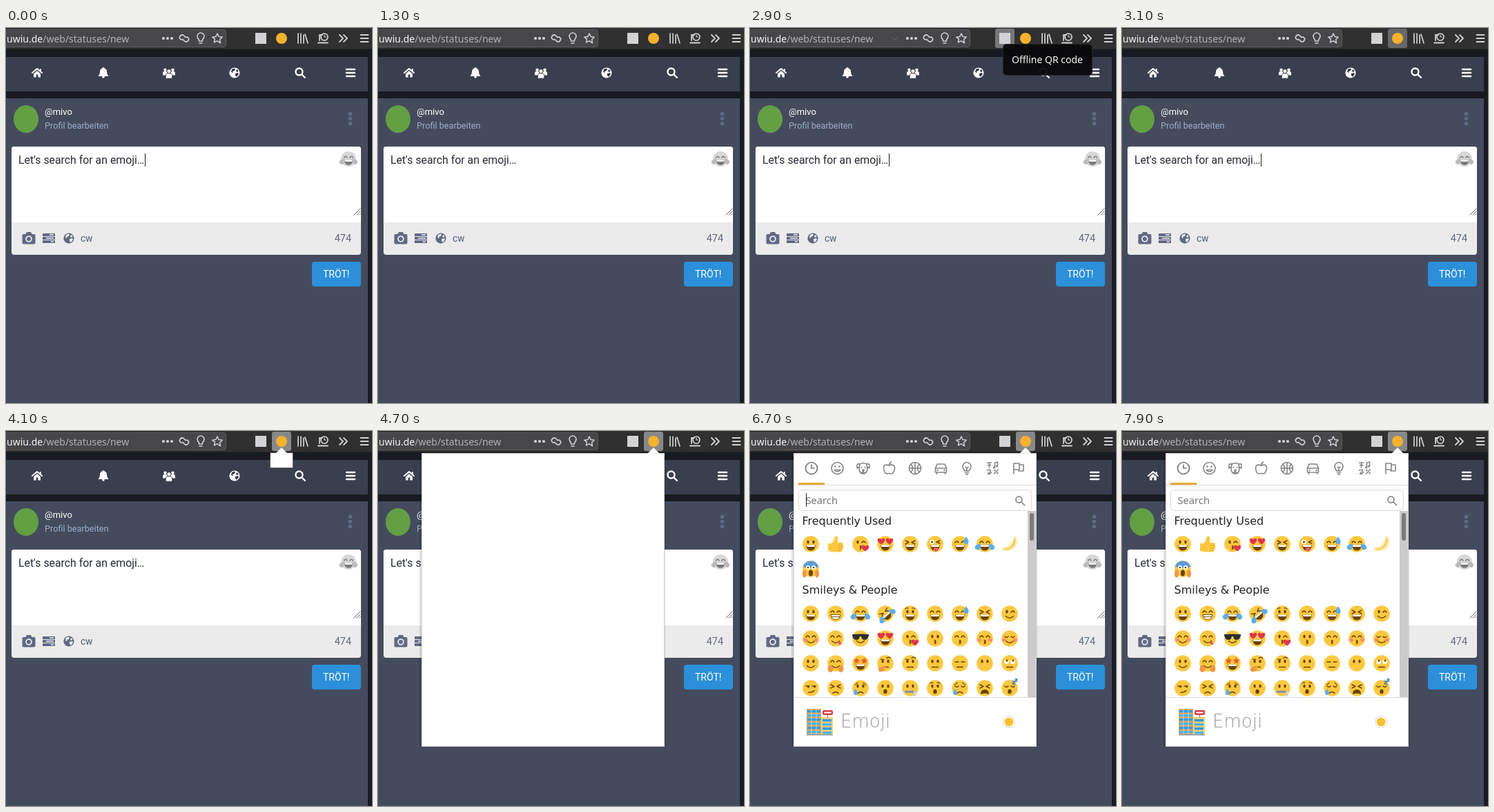
An HTML page for the animation above (8000 ms loop, 530 by 544 pixels).

```html
<!DOCTYPE html>
<html lang="de">
<head>
<meta charset="utf-8">
<title>Emoji picker</title>
<style>
  html, body { margin: 0; width: 100%; height: 100%; overflow: hidden; background: #191b22; }
  svg { display: block; width: 100vw; height: 100vh; }
  text { white-space: pre; }
  .roboto { font-family: Roboto, sans-serif; }
  .noto { font-family: "Noto Sans", sans-serif; }
  .dejavu { font-family: "DejaVu Sans", sans-serif; }
  .gray { filter: grayscale(1); opacity: .72; }
</style>
</head>
<body>
<svg id="stage" viewBox="0 0 530 544"></svg>
<script>
const LOOP = 8000;
const BROWN = '#664500', RED = '#e0344a', BLUE = '#5dadec', YELLOW = '#fdc840', SLATE = '#606984';

// Drawing helpers
const fill = (d, color) => `<path d="${d}" fill="${color}"/>`;
const line = (d, color = BROWN, width = 1.5) =>
  `<path d="${d}" fill="none" stroke="${color}" stroke-width="${width}" stroke-linecap="round" stroke-linejoin="round"/>`;
const oval = (x, y, rx, ry, color) => `<ellipse cx="${x}" cy="${y}" rx="${rx}" ry="${ry}" fill="${color}"/>`;
const disc = (x, y, r, color) => oval(x, y, r, r, color);
const ring = (x, y, r, color, width) =>
  `<circle cx="${x}" cy="${y}" r="${r}" fill="none" stroke="${color}" stroke-width="${width}"/>`;
const box = (x, y, w, h, color, r = 0, more = '') =>
  `<rect x="${x}" y="${y}" width="${w}" height="${h}" rx="${r}" fill="${color}" ${more}/>`;
const text = (x, y, size, color, font, words, more = '') =>
  `<text x="${x}" y="${y}" font-size="${size}" fill="${color}" class="${font}" ${more}>${words}</text>`;
const at = (x, y, art, more = '') => `<g transform="translate(${x} ${y}) ${more}">${art}</g>`;
const during = (spans, art, more = '') => `<g data-on="${spans}" ${more}>${art}</g>`;

const heart = (x, y, s) => at(x, y, fill('M0 4C-8-1-4-6 0-2.4 4-6 8-1 0 4z', RED), `scale(${s})`);
const drop = (x, y, s = 1) => at(x, y, fill('M0-4C2-1 3 0 3 2A3 3 0 0 1-3 2C-3 0-2-1 0-4z', BLUE), `scale(${s})`);
const star = (x, y, r, color) => {
  const points = Array.from({ length: 10 }, (_, i) => {
    const a = i * Math.PI / 5, k = i % 2 ? r * .48 : r;
    return `${(x + k * Math.sin(a)).toFixed(2)},${(y - k * Math.cos(a)).toFixed(2)}`;
  });
  return fill(`M${points.join('L')}z`, color);
};

// Face parts, drawn around the centre of a disc with radius 12
const parts = {
  dots: oval(-4, -3, 1.7, 2.5, BROWN) + oval(4, -3, 1.7, 2.5, BROWN),
  arcs: line('M-7-2q2.5-4 5 0M2-2q2.5-4 5 0'),
  squint: line('M-7-5l5 2.5-5 2.5M7-5l-5 2.5 5 2.5'),
  wink: oval(-4, -3, 1.7, 2.5, BROWN) + line('M2-2q2.5-4 5 0'),
  lids: line('M-7-3q2.5 3 5 0M2-3q2.5 3 5 0'),
  dashes: line('M-7-2h5M2-2h5'),
  side: line('M-7-3h5M2-3h5') + disc(-3.5, -2, 1.5, BROWN) + disc(5.5, -2, 1.5, BROWN),
  hearts: heart(-6, -4, 1.15) + heart(6, -4, 1.15),
  stars: star(-5.5, -3.5, 5.2, '#e95f28') + star(5.5, -3.5, 5.2, '#e95f28'),
  shades: fill('M-12-6Q0-7 12-6v2q-1 1-1.5 3.5Q9 2 5.5 2 2 2 1-3h-2Q-2 2-5.5 2-9 2-10.5-.5-11-3-12-4z', '#292f33'),
  roll: disc(-4.5, -2, 3.3, '#fff') + disc(4.5, -2, 3.3, '#fff') + disc(-4, -4, 1.5, BROWN) + disc(5, -4, 1.5, BROWN),
  wide: disc(-4.5, -3, 3.3, '#fff') + disc(-4.5, -3, 1.6, BROWN) + line('M2-3l5-2M2-3l5 2'),
  brows: line('M-7-7q2-2 4-1M3-8q2-1 4 1', BROWN, 1.2),
  skeptic: line('M-7-6l5 .6M2-7.5q2.5-2.5 5.5 0', BROWN, 1.2),
  worry: line('M-8-5q2 0 4-3M8-5q-2 0-4-3', BROWN, 1.2),
  grin: fill('M-7 1.5h14Q6 9.5 0 9.5T-7 1.5z', BROWN) + fill('M-6.3 1.5h12.6l-.6 2.4H-5.7z', '#fff'),
  teeth: fill('M-7 1.5h14Q6 8.5 0 8.5T-7 1.5z', '#fff') + line('M-7 1.5h14Q6 8.5 0 8.5T-7 1.5zM-6 4.5H6', BROWN, .9),
  smile: line('M-5.5 3.5q5.5 5.5 11 0'),
  smirk: line('M-3 6q5 1 8-2.5'),
  kiss: line('M-.8 2.5q4 .8 0 2.5 4 1.2 0 2.7', BROWN, 1.4),
  flat: line('M-4.5 5.5h9'),
  frown: line('M-4 7.5q4-4 8 0'),
  oh: oval(0, 5, 2.7, 3.3, BROWN),
  wail: fill('M-6 9Q-6 2 0 2T6 9Q0 6-6 9z', BROWN),
  tongue: fill('M-2 5h6v4q-3 4-6 0z', '#e8596e'),
  lick: fill('M2 5q5-2 6 1t-3 3z', '#e8596e'),
  blush: oval(-8, 2, 3, 2.5, '#ff8a70') + oval(8, 2, 3, 2.5, '#ff8a70'),
  tears: at(-9, 3, drop(0, 0, 1.2), 'rotate(40)') + at(9, 3, drop(0, 0, 1.2), 'rotate(-40)'),
  sweat: drop(9, -6, 1.2),
  tear: drop(-7, 5),
  love: heart(7, 6, 1.15),
  zip: box(-8, 3.5, 15, 3.5, '#9aa9b5', 1) + line('M-6.5 5.2h12', '#5e6b76', .8) + box(5, 4, 3, 8, '#c8d2da', 1),
  hands: oval(-7.5, 8, 4, 5, '#ef9645') + oval(7.5, 8, 4, 5, '#ef9645'),
  think: fill('M-9 12q-3-5 1-6l8-2q2 1 0 2l-4 1.5q5 0 3 2-1 3-8 2.5z', '#ef9645'),
  snooze: line('M4-10h4l-4 4h4M8-13h3l-3 3h3', '#3b78b5', 1.5),
  scream: fill('M-11.5-3A12 12 0 0 1 11.5-3Q0 1-11.5-3z', '#5b9bd5') + disc(-4, -2, 3, '#fff') + disc(4, -2, 3, '#fff') +
    disc(-4, -2, 1.3, BROWN) + disc(4, -2, 1.3, BROWN) + oval(0, 6, 3, 4.5, BROWN) +
    oval(-9, 7, 3, 5.5, '#ef9645') + oval(9, 7, 3, 5.5, '#ef9645')
};
const face = names => disc(0, 0, 11.8, YELLOW) + names.split(' ').map(n => parts[n]).join('');

const objects = {
  thumb: fill('M-11-1h5q4-4 5-10 4-2 4.500 3.500L3-2h6q3 1 1.500 3.500 2 2 0 4 1 2-1 3.300 0 2.700-3 2.700H-3q-4 0-8-2z', YELLOW) +
    line('M4 2h6M4 5.500h5M4 9h4', '#e69a30', .9),
  banana: fill('M6-10l3-1q4 11-3 17Q-2 12-10 9l-1-3Q4 4 6-10z', '#ffe38a') + line('M-7 7Q6 6 7.500-7', '#f1b93c', 1.2) +
    fill('M2-5q3 8-6 11l-5-1Q0 2 2-5z', '#fff3cf'),
  rofl: at(0, 0, face('squint grin tears'), 'rotate(-40)')
};
const emoji = name => objects[name] || face(name);

const joy = 'arcs grin tears', cool = 'wink kiss love';
const frequent = ['dots grin', 'thumb', cool, 'hearts grin', 'squint grin', 'wide grin tongue', 'arcs grin sweat', joy, 'banana', 'scream'];
const smileys = [
  'dots grin', 'arcs teeth', joy, 'rofl', 'dots brows grin', 'arcs grin', 'arcs grin sweat', 'squint grin', 'wink smile',
  'arcs smile blush', 'arcs smile lick', 'shades smile', 'hearts grin', cool, 'dots kiss', 'arcs kiss', 'arcs kiss blush', 'lids smile blush',
  'dots smile', 'arcs smile hands', 'stars grin', 'dots skeptic flat think', 'dots skeptic flat', 'dots flat', 'dashes flat', 'dots', 'roll flat',
  'side smirk', 'squint frown', 'dots worry frown tear', 'dots oh', 'dots zip', 'dots brows oh', 'lids worry frown tear', 'squint wail', 'lids oh snooze'
];
const grid = (names, top) =>
  names.map((name, i) => at(88 + i % 9 * 36, top + Math.floor(i / 9) * 36, emoji(name))).join('');

const globe = (color, land) => disc(0, 0, 7.6, color) +
  fill('M-4-5q3-2 5-1l-1 3-3 1 1 2-3-1zM1 1l4-1 1 2-3 4-2-2zM3-5l3 2-2 2-2-1z', land);
const glass = (color, r, w) => ring(-1.5, -1.5, r, color, w) + line(`M${r * .6} ${r * .6}l4 4`, color, w);
const bars = (color, half, gap, w) => line(`M${-half} ${-gap}h${half * 2}M${-half} 0h${half * 2}M${-half} ${gap}h${half * 2}`, color, w);
const person = (x, y, s) => at(x, y, disc(0, -4, 3.2, '#fff') + fill('M-5 7V3q0-4 5-4t5 4v4z', '#fff'), `scale(${s})`);

function toolbar() {
  const c = '#d2d2d4';
  return box(0, 0, 530, 31, '#303031') + box(0, 30.5, 530, 1, '#1c1c1e') +
    box(-8, 2.5, 326.5, 25, '#474749', 3, 'stroke="#5d5d5f"') +
    during('2500-2600', box(270, 3, 24, 24, '#69696b') + box(295, 3, 23, 24, '#606062') + line('M294.5 3v24M270 3v24', '#77777a', 1)) +
    during('2800-3000', line('M205 13.500l4 4 4-4', '#5c5c5e', 1.5)) +
    during('2800-3100', box(355, 1, 28, 28, '#78787a', 3)) +
    during('3100-3400', box(385, 1, 28, 28, '#68686a', 3)) +
    during('3400-8000', box(385, 1, 28, 28, '#88888a', 3)) +
    text(1, 20.5, 14, '#f4f4f5', 'noto', 'uwiu.de<tspan fill="#b1b1b3">/web/statuses/new</tspan>') +
    [228, 234, 240].map(x => disc(x, 15, 2.1, c)).join('') +
    at(258, 15, line('M-2 1.500l-2 .5q-4-2-2-5t5-1.500l3 3M2-1.500l2-.5q4 2 2 5t-5 1.500l-3-3', c, 1.7)) +
    at(282, 15, line('M-2.500 4V2Q-5-1-5-3a5 5 0 0 1 10 0q0 2-2.500 5v2zM-2 7h4', c, 1.6)) +
    at(306, 15, line('M0-7l2.200 4.600 5 .7-3.600 3.500.9 5L0 3.600-4.500 5.800l.9-5L-7.200-1.700l5-.7z', c, 1.5)) +
    box(361, 7, 16, 16, c) + disc(399, 15, 8, '#f6b12e') +
    at(429, 15, line('M-6-7V7M-2-7V7M2-5V7M4-6l4 13', c, 1.7)) +
    at(459, 15, line('M-5 3V-5h4M-7 6.500H7', c, 1.8) + ring(2, -2, 5, c, 1.7) + line('M2-5v3h2.500', c, 1.2)) +
    at(489, 15, line('M-6-5l5 5-5 5M0-5l5 5-5 5', c, 1.8)) + at(519, 15, bars(c, 5.5, 5, 1.8));
}

function page() {
  const nav = '#393f4f', w = '#fff';
  return box(0, 42, 524, 50, nav) + box(0, 102, 524, 442, '#444b5d') +
    at(45, 65, line('M-7 0L0-6 7 0M4.800-5v2.500', w, 2) + fill('M-5 1.500L0-3 5 1.500V6.500H1.400V2.500H-1.400V6.500H-5z', w)) +
    at(141, 65, disc(0, -6.5, 1.5, w) + fill('M-7.500 5Q-5 2.500-5-1.500-5-6.500 0-7 5-6.500 5-1.500 5 2.500 7.500 5z', w) + disc(0, 6, 1.8, w)) +
    at(236, 65, person(-5.5, -1.5, .7) + person(5.5, -1.5, .7) + `<g stroke="${nav}" stroke-width="1">${person(0, 1.5, .95)}</g>`) +
    at(331, 65, globe(w, nav)) + at(426, 65, glass(w, 5, 2.4)) + at(499, 65, bars(w, 6, 5, 2.5)) +
    oval(29, 132, 18, 20, '#62a043') +
    text(56, 126, 13, '#fff', 'roboto', '@mivo') + text(56, 146, 12.7, '#9baec8', 'roboto', 'Profil bearbeiten') +
    [122, 129, 136].map(y => box(496, y, 5, 5, SLATE, 1)).join('') +
    box(8, 172, 506, 157, '#ebebeb', 4) + fill('M8 282V176q0-4 4-4h498q4 0 4 4v106z', '#fff') +
    text(18, 197, 15.85, '#282c37', 'roboto', 'Let\'s search for an emoji…') +
    during('0-200 900-1300 2600-4000', box(201, 182, 1, 19, '#222')) +
    `<g class="gray">${at(496, 190, emoji(joy), 'scale(.93)')}</g>` +
    line('M504 271l9-9M508 271l5-5M511.500 271l1.500-1.500', '#666', 1) +
    at(33, 305, fill('M-9.500-4q0-2 2-2h3l1.500-3h6l1.500 3h3q2 0 2 2V6.500q0 2-2 2h-15q-2 0-2-2z', SLATE) + ring(0, 1, 3.9, '#ebebeb', 1.8)) +
    at(62, 305, [-7, -2, 3].map((y, i) => box(-9, y, 18, 4, SLATE, .5) + box([1, -4, 3][i], y + 1.2, [6, 11, 4][i], 1.5, '#ebebeb')).join('')) +
    at(91, 305, globe(SLATE, '#ebebeb')) +
    text(108, 310, 11.3, SLATE, 'roboto', 'CW', 'font-weight="500"') +
    text(500, 310, 14.4, SLATE, 'roboto', '474', 'text-anchor="end"') +
    box(443, 339, 71, 36, '#2b90d9', 4) + text(459, 362, 14, '#fff', 'roboto', 'TRÖT!');
}

function categoryTabs() {
  const g = '#858585', draw = d => line(d, g, 1.6);
  const icons = [
    ring(0, 0, 8.5, '#777', 1.7) + line('M0-5v5h4', '#777', 1.6),
    ring(0, 0, 8.5, g, 1.6) + disc(-3, -2.5, 1.3, g) + disc(3, -2.5, 1.3, g) + draw('M-4.500 2.500h9q-4.500 5-9 0'),
    draw('M-5-6q-5-2-4 6l3-2M5-6q5-2 4 6l-3-2M-5-6q5-3 10 0l1 8q-1 6-6 6t-6-6zM0 4v3M-3 7q3-3 6 0') + disc(-2.5, -1, 1.1, g) + disc(2.5, -1, 1.1, g) + oval(0, 3, 2, 1.4, g),
    draw('M0-4q-8-3-8 4 1 8 5 8 3-1 6 0 4 0 5-8 0-7-8-4zM0-4q0-3 3-5'),
    ring(0, 0, 8.5, g, 1.6) + draw('M-8.500 0h17M0-8.500v17M-6-6q5 6 0 12M6-6q-5 6 0 12'),
    draw('M-8 0l2.500-6h11L8 0v6H-8zM-8 0H8M-6 6v2.500M6 6v2.500') + disc(-5, 3, 1.2, g) + disc(5, 3, 1.2, g),
    draw('M-3 4Q-6 0-6-2.500a6 6 0 0 1 12 0Q6 0 3 4zM-2.500 6.500h5M-1.500 9h3M-2-2l2 2 2-2M0 0v4'),
    draw('M-8-8h6M-5-8v7M-7-4.500h4M3-1v-7l4-1v6M-8 3q5-2 5 1l-4 4q3 1 5-2M2 8L8 2') + disc(2, -1, 1.6, g) + disc(6, -3, 1.6, g) + disc(3, 3, 1.3, g) + disc(7, 7, 1.3, g),
    draw('M-7-7v15M-7-7h8v9h-8M1-5h6v9H0l1-2')
  ];
  return icons.map((icon, i) => at(89 + i * 37.5, 54, icon)).join('');
}

function building() {
  const windows = (x, y, w, rows) => Array.from({ length: rows }, (_, i) => box(x, y + i * 6, w, 3.5, i % 2 ? '#4bb3ee' : '#329be0')).join('');
  return box(82, 403, 21, 38, '#e1a95b') + windows(83, 405, 19, 6) + line('M89 404v36M96 404v36', '#c9e8fb', .8) +
    box(103, 415, 17, 26, '#f3cf7b') + windows(105, 418, 13, 4) +
    box(105, 405, 15, 7, '#d83a43', 2) + line('M108 408.500h9', '#fff', 2) + line('M112.500 412v3', '#777', 1) + box(82, 440, 38, 1.5, '#8899a6');
}

function picker() {
  return categoryTabs() + box(64, 78, 350, 1, '#d9d9d9') + box(70, 75, 38, 3, '#e9a937') +
    box(70.5, 85.5, 337, 30, '#fff', 5, 'stroke="#d9d9d9"') +
    text(80.5, 106, 14.7, '#757575', 'noto', 'Search') +
    during('6700-7900', box(81, 90, 1, 20, '#222')) +
    at(391, 101, glass('#777', 4.5, 1.5)) +
    text(75.5, 136, 16, '#222427', 'dejavu', 'Frequently Used') + text(75.5, 236, 16, '#222427', 'dejavu', 'Smileys &amp; People') +
    grid(frequent, 164) + `<g clip-path="url(#list)">${grid(smileys, 265)}</g>` +
    box(402, 116, 12, 270, '#cbcbcb') + box(405, 119, 6, 40, '#7b7b7b', 3) +
    box(64, 386, 350, 1, '#d9d9d9') + building() +
    text(131, 430, 26, '#999', 'dejavu', 'Emoji', 'font-weight="200"') +
    ring(375, 422, 8.5, '#d4d4d4', 1) + disc(375, 422, 6.3, '#fbc02f');
}

const arrow = fill('M390.500 32.500L399 24l8.500 8.500z', '#fff');
const smallPopup = box(383, 32, 32, 21, '#fff', 0, 'stroke="#ddd" stroke-width=".5"') + arrow;
const tooltip = box(366.5, 23.5, 129, 45, '#0a0a0b', 5, 'opacity=".95" stroke="#242426"') +
  text(379, 51, 14, '#f4f4f5', 'noto', 'Offline QR code');
const panel = box(60, 32, 356, 426, '#000', 2, 'opacity=".12"') +
  box(63.5, 32.5, 351, 425, '#fff', 0, 'stroke="#d5d5d8"') + arrow;

const stage = document.getElementById('stage');
stage.innerHTML = '<clipPath id="list"><path d="M64 116h338v270H64z"/></clipPath>' +
  box(0, 0, 530, 544, '#191b22') + page() + toolbar() +
  during('2900-3100', tooltip) +
  during('4000-4100', smallPopup, 'opacity=".5"') + during('4100-4700', smallPopup) +
  during('4700-8000', panel) + during('5000-8000', picker());

const timed = [...stage.querySelectorAll('[data-on]')].map(node => ({
  node, spans: node.dataset.on.split(' ').map(span => span.split('-').map(Number))
}));

const start = performance.now();
function show() {
  const t = (performance.now() - start) % LOOP;
  for (const { node, spans } of timed) {
    node.style.display = spans.some(([from, to]) => t >= from && t < to) ? '' : 'none';
  }
  requestAnimationFrame(show);
}
show();
</script>
</body>
</html>
```
